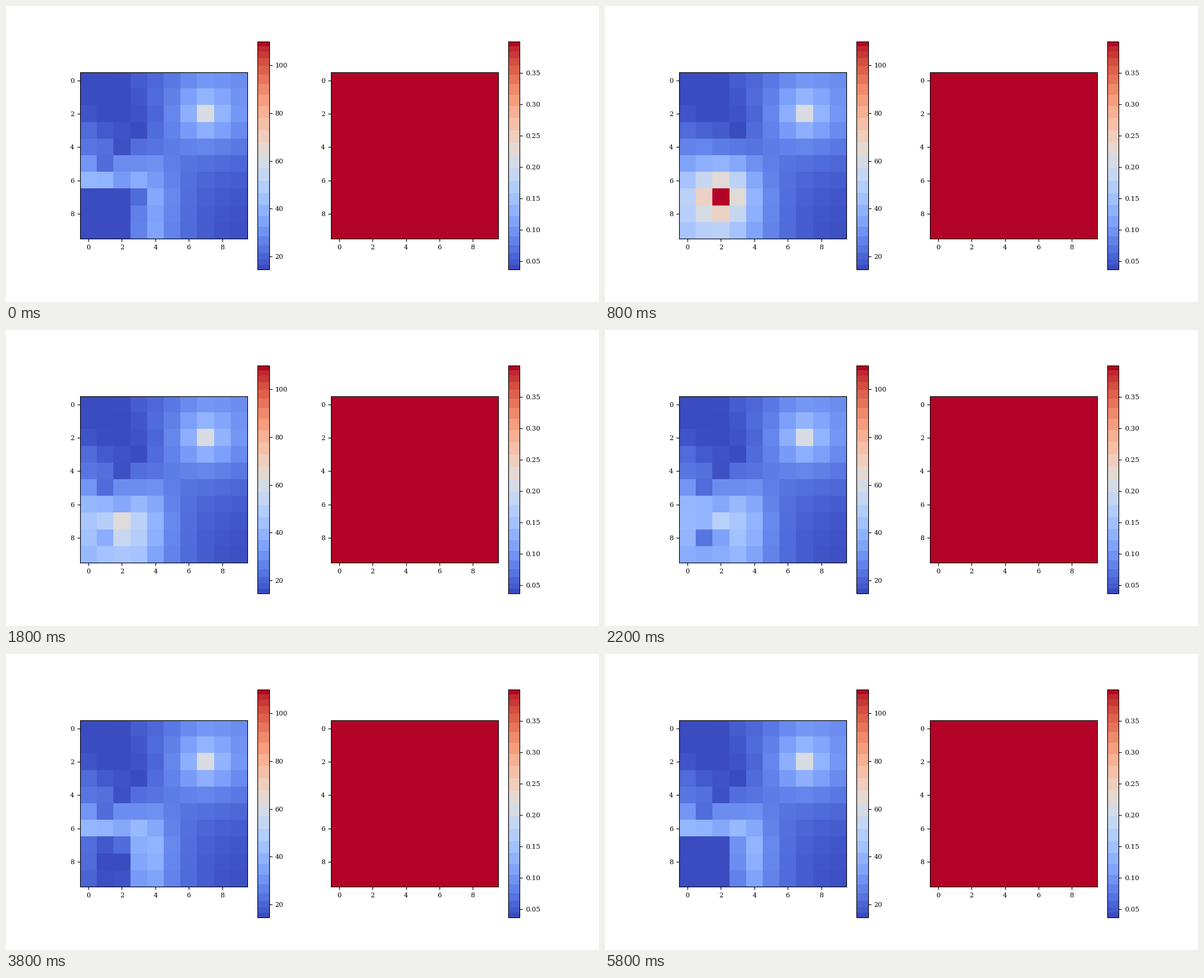
Write a matplotlib script that moves like this. It is 1000x500 px and loops after 6000 ms.

```python
import numpy as np
import matplotlib.pyplot as plt
from matplotlib.animation import FuncAnimation
from matplotlib.cm import ScalarMappable
from matplotlib.colors import ListedColormap, Normalize

plt.rcParams.update({"font.family": "DejaVu Serif", "font.size": 8})

FRAMES, INTERVAL, SIZE = 30, 200, 10
HEAT_RANGE = (14.6, 109.9)
RIGHT_RANGE = (0.0368, 0.4)
SOURCES = [(7, 2, 90.5), (2, 7, 43)]  # row, column, strength
NEAR, CENTRE = 0.9, 0.7               # cooling factors


def hot_field():
    """Heat halves with each cell of distance; the walls reflect it."""
    rows, cols = np.mgrid[:SIZE, :SIZE]
    field = np.full((SIZE, SIZE), HEAT_RANGE[0] - 1)
    for r, c, strength in SOURCES:
        for sr in (r, -1 - r, 2 * SIZE - 1 - r):
            for sc in (c, -1 - c, 2 * SIZE - 1 - c):
                field += strength * 0.5 ** np.hypot(rows - sr, cols - sc)
    return field


def cooler_path():
    """Cell visited at each step: approach, hover beside the fire, leave."""
    approach = [(k, k) for k in range(4)]
    descent = [(4, 2), (5, 1), (6, 2), (7, 2)]
    right_turns = (10, 13, 16, 21, 29)
    hover = [(8, 2 if n in right_turns else 1) for n in range(9, FRAMES)]
    return approach + descent + hover + [(7, 3)]


def simulate():
    field, states = hot_field(), []
    for r, c in cooler_path():
        centre = field[r, c] * CENTRE
        field[max(r - 1, 0):r + 2, max(c - 1, 0):c + 2] *= NEAR
        field[r, c] = centre
        states.append(field.copy())
    return states


def banded_map(count=24, size=512):
    """Coolwarm in flat steps, narrow at the ends and wide in the middle."""
    t = np.linspace(-1, 1, count + 1)
    edges = 0.5 + 0.5 * (0.4 * t + 0.6 * np.sin(np.pi / 2 * t))
    mids = (edges[:-1] + edges[1:]) / 2
    mids[0], mids[-1] = 0, 1
    pos = (np.arange(size) + 0.5) / size
    return ListedColormap(plt.cm.coolwarm(mids[np.digitize(pos, edges) - 1]))


def add_bar(ax, limits, ticks, fmt):
    bar = fig.colorbar(ScalarMappable(Normalize(*limits), bands), ax=ax,
                       ticks=ticks, format=fmt)
    bar.ax.minorticks_off()


bands = banded_map()
states = simulate()
fig, (left, right) = plt.subplots(1, 2, figsize=(10, 5), dpi=100)

heat = left.imshow(states[-1], cmap="coolwarm",
                   vmin=HEAT_RANGE[0], vmax=HEAT_RANGE[1])
right.imshow(np.full((SIZE, SIZE), RIGHT_RANGE[1]), cmap=bands,
             vmin=RIGHT_RANGE[0], vmax=RIGHT_RANGE[1])
for ax in (left, right):
    ax.set_xticks(range(0, SIZE, 2))
    ax.set_yticks(range(0, SIZE, 2))

add_bar(left, HEAT_RANGE, range(20, 101, 20), "%d")
add_bar(right, RIGHT_RANGE, np.arange(1, 8) * 0.05, "%.2f")


def update(n):
    # The fire restarts on the second frame of each loop.
    heat.set_data(states[n - 1])
    return [heat]


anim = FuncAnimation(fig, update, frames=FRAMES, interval=INTERVAL,
                     repeat=True, repeat_delay=0)
plt.show()
```
